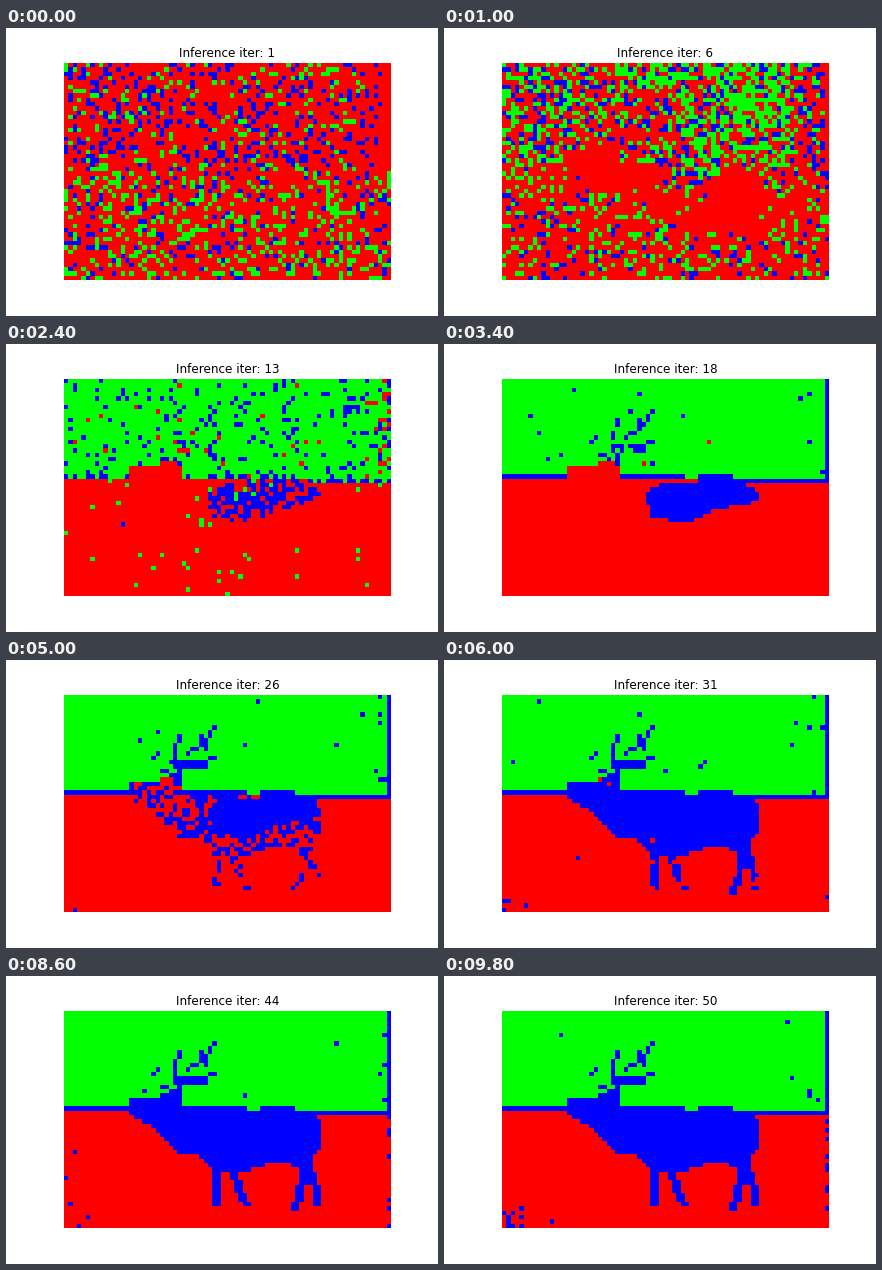
A matplotlib script for the animation above (10 s loop, 432 by 288 pixels).

```python
import numpy as np
import matplotlib.pyplot as plt
from matplotlib.animation import FuncAnimation
from matplotlib.path import Path

W, H, DPI = 432, 288, 72
LEFT, BOTTOM, WIDE, HIGH = 58, 36, 327, 217
COLS, ROWS = 75, 50
ITERS = 50
RED, GREEN, BLUE = range(3)
PALETTE = 255 * np.eye(3, dtype=np.uint8)

row, col = np.mgrid[0:ROWS, 0:COLS]
centers = np.column_stack([col.ravel(), row.ravel()]) + 0.5


def fill(*corners):
    """Cells whose centre lies inside a polygon."""
    return Path(corners).contains_points(centers).reshape(ROWS, COLS)


def trace(*points, width=1):
    """Cells along a polyline, widened to the right."""
    mask = np.zeros((ROWS, COLS), bool)
    for a, b in zip(points, points[1:]):
        n = np.abs(np.subtract(b, a)).max() + 1
        xs, ys = np.rint(np.linspace(a, b, n)).astype(int).T
        for dx in range(width):
            mask[ys, xs + dx] = True
    return mask


def bump(cx, cy, rx, ry):
    return np.exp(-((col - cx) / rx) ** 2 - ((row - cy) / ry) ** 2)


def fade(it, middle, width):
    """Smooth fall from 1 to 0 around an iteration."""
    return 1 / (1 + np.exp((it - middle) / width))


# The animal
body = fill((15, 20), (27, 20), (27, 23), (57, 23), (59, 26), (59, 31),
            (57, 33), (57, 36), (48, 35), (41, 37), (34, 37), (31, 33),
            (26, 33), (19.2, 26), (15, 24)) | trace((22, 19), (26, 19))
core = fill((33, 26), (37, 24), (53, 23), (59, 26), (59, 28), (49, 30),
            (43, 33), (34, 32))
legs = (trace((34, 36), (34, 44), width=2)
        | trace((38, 36), (39, 41), (41, 44), width=2)
        | trace((54, 36), (53, 43), (52, 45), width=2)
        | trace((55, 36), (57, 40), (57, 44), width=2))
antlers = (trace((26, 9), (25, 11), (25, 14), (26, 19))
           | trace((34, 7), (32, 10), (32, 12))
           | trace((31, 9), (31, 11), (28, 13))
           | trace((34, 14), (31, 15), (26, 15))
           | trace((32, 16), (26, 16))
           | trace((21, 13), (20, 14))
           | trace((22, 17), (26, 18)))

# Horizon, back and right border
line = (trace((0, 22), (14, 22)) | trace((27, 22), (41, 22))
        | trace((45, 22), (52, 22)) | trace((53, 23), (74, 23), (74, 0)))
ground = (row >= np.where(col < 53, 23, 24)) | body

# Iteration at which each cell turns blue for good
spread = np.random.default_rng(7).random((ROWS, COLS))
birth = np.full((ROWS, COLS), np.inf)
for part, first, last in ((legs, 23, 33), (body, 20, 31), (antlers, 11, 19),
                          (line, 11, 16), (core, 10, 15)):
    birth[part] = first + (last - first) * spread[part]

# Regions that settle sooner or later than the rest
calm = np.clip(2 * bump(25, 24, 11, 5) + 2 * bump(47, 32, 13, 6), 0, 1)
flank = bump(43, 26, 7, 4)
warm = bump(33, 9, 10, 5) + bump(22, 18, 14, 4) - bump(53, 6, 9, 7)
rim = np.exp((col - COLS + 1) / 3)
corner = np.exp(-col / 4 - (ROWS - 1 - row) / 3)
border = col == COLS - 1


def pick(u, red, blue):
    return np.where(u < red, RED, np.where(u < red + blue, BLUE, GREEN))


def labels(it):
    rng = np.random.default_rng(100 + it)
    u = rng.random((ROWS, COLS))
    settle = 1 - fade(it, 3, 0.8)
    late = 1 - fade(it, 30, 2)

    red = 0.72 * fade(it, 6.5, 1.5)
    red = red + settle * fade(it, 8, 0.8) * 0.3 * warm
    red = red + fade(it, 13, 0.8) * (0.5 * rim + 0.35 * antlers)
    blue = (0.11 + 0.009 * it) * fade(it, 13, 1.2) + 0.15 / it ** 1.2
    blue = np.minimum(blue, 0.2) + 0.08 * rim * (1 - fade(it, 14, 1))
    sky = pick(u, red, blue)

    noise = fade(it, 10, 1.3) * (1 - settle * calm)
    mixed = settle * flank * fade(it, 14, 1)
    green = 0.19 * noise + 0.35 * mixed
    blue = 0.11 * noise * fade(it, 10, 1.3) + 0.25 * mixed
    blue = blue + late * (0.5 * corner + 0.18 * border)
    low = pick(u, 1 - green - blue, blue)

    out = np.where(ground, low, sky)
    out[it >= birth + rng.normal(0, 0.6, birth.shape)] = BLUE
    return out


fig = plt.figure(figsize=(W / DPI, H / DPI), dpi=DPI, facecolor="white")
ax = fig.add_axes([LEFT / W, BOTTOM / H, WIDE / W, HIGH / H])
ax.axis("off")
image = ax.imshow(PALETTE[labels(1)], interpolation="nearest", aspect="auto")
title = ax.set_title("", x=(0.5125 * W - LEFT) / WIDE, fontsize=12,
                     family="DejaVu Sans")


def update(i):
    image.set_data(PALETTE[labels(i + 1)])
    title.set_text(f"Inference iter: {i + 1}")
    return image, title


anim = FuncAnimation(fig, update, frames=ITERS, interval=200,
                     repeat=True, repeat_delay=0)
plt.show()
```
